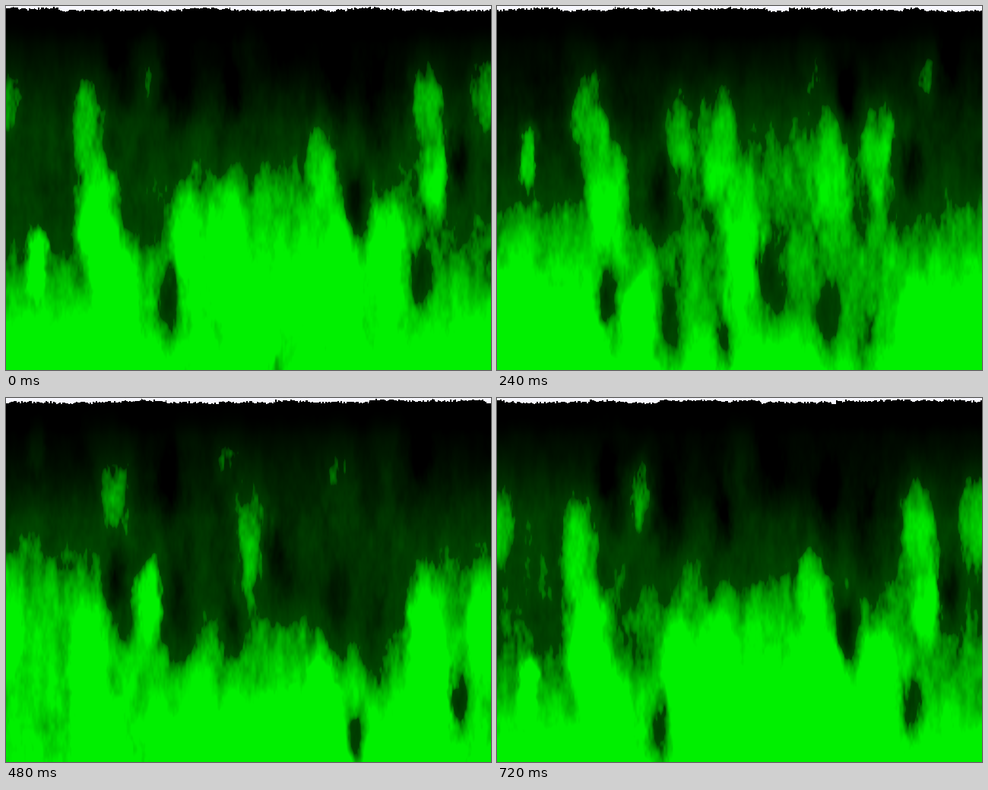
Animation of 638 by 479 pixels, one loop 800 ms. Source, as an HTML page with a canvas:

```html
<!DOCTYPE html>
<html lang="en">
<head>
<meta charset="utf-8">
<title>Green fire</title>
<style>
html, body { margin: 0; width: 100%; height: 100%; overflow: hidden; background: #000; }
canvas { display: block; width: 638px; height: 479px; }
</style>
</head>
<body>
<canvas id="fire" width="638" height="479"></canvas>
<script>
const W = 638, H = 479, TILE = 480;
const STEPS = 10, STEP_MS = 80, RISE = TILE / STEPS;

// Key points of the fire: x, y, half height
const flames = [
  [105, 135, 75], [120, 270, 85], [145, 385, 90], [240, 300, 70],
  [289, 315, 85], [322, 440, 90], [437, 355, 85], [503, 320, 70],
  [418, 215, 70], [553, 110, 80], [567, 210, 70], [3, 95, 70],
  [628, 100, 75], [41, 340, 45], [190, 70, 55]
];
const hollows = [
  [150, 58, 55], [226, 85, 75], [297, 104, 45], [362, 20, 60],
  [435, 90, 65], [485, 100, 75], [597, 205, 45], [465, 258, 50],
  [545, 350, 45], [212, 400, 55]
];

const clamp = (v, lo = 0, hi = 1) => Math.min(hi, Math.max(lo, v));
const mix = (a, b, t) => a + (b - a) * t;
const ease = t => t * t * (3 - 2 * t);

function hash(x, y, seed) {
  let n = Math.imul(x, 374761393) ^ Math.imul(y, 668265263) ^ Math.imul(seed, 1442695041);
  n = Math.imul(n ^ (n >>> 13), 1274126177);
  n = Math.imul(n ^ (n >>> 15), 2246822519);
  return ((n ^ (n >>> 16)) >>> 0) / 4294967296;
}

// Smooth noise in -1..1 that repeats every TILE pixels vertically
function noise(x, y, cw, ch, seed) {
  const rows = TILE / ch;
  const gx = x / cw, gy = y / ch;
  const ix = Math.floor(gx), iy = Math.floor(gy);
  const tx = ease(gx - ix), ty = ease(gy - iy);
  const r0 = ((iy % rows) + rows) % rows, r1 = (r0 + 1) % rows;
  const top = mix(hash(ix, r0, seed), hash(ix + 1, r0, seed), tx);
  const low = mix(hash(ix, r1, seed), hash(ix + 1, r1, seed), tx);
  return mix(top, low, ty) * 2 - 1;
}

// Several octaves of noise, stretched upwards like licking flames
function streaks(x, y, seed) {
  let sum = 0;
  for (let o = 0, size = 20, amp = .1; o < 4; o++, size /= 2, amp *= .66) {
    sum += amp * noise(x, y, size, size * 3, seed + o);
  }
  return sum;
}

// Squared distance from a key point, in units of its size
function reach(x, y, [px, py, size]) {
  const dx = (x - px) / (size * .31);
  let dy = y - py;
  dy = (dy - TILE * Math.round(dy / TILE)) / size;
  return dx * dx + dy * dy;
}

function heatAt(x, y) {
  const wx = x + 45 * streaks(x, y, 10);
  const wy = y + 90 * streaks(x, y, 20);
  const turn = Math.PI * 2;
  let h = .53 + .18 * Math.cos(turn * (wx - 60) / W) * Math.cos(turn * (wy - 65) / TILE);
  for (const p of flames) {
    const q = reach(wx, wy, p);
    if (q < 3) h = mix(h, .95, Math.exp(-q * q));
  }
  for (const p of hollows) {
    const q = reach(wx, wy, p);
    if (q < 5) h = mix(h, .02, Math.exp(-q * 1.2));
  }
  return h + streaks(x, y, 30);
}

function green(h, y) {
  const need = (460 - y) / 400 + Math.max(0, 50 - y) / 70;
  const d = h - need;
  const dim = 70 * clamp(1 + 1.3 * d) * clamp((y - 8) / 150);
  return d <= 0 ? dim : mix(dim, 240, Math.pow(clamp(d / .38), .62));
}

function edgeDepth(x, step) {
  const seed = 40 + step;
  const shelf = noise(x, 0, 46, 60, seed) > 0 ? 1.5 : 4;
  const ripple = 1.2 * noise(x, 0, 11, 60, seed + STEPS);
  return Math.max(1, shelf + ripple + 2.8 * hash(x >> 1, step, 70));
}

const ctx = document.getElementById('fire').getContext('2d');
const image = ctx.createImageData(W, H);
const heat = Float32Array.from({ length: W * TILE }, (_, i) => heatAt(i % W, Math.floor(i / W)));
let shown = -1;

function draw(step) {
  const px = image.data;
  const shift = step * RISE;
  for (let y = 0, i = 0; y < H; y++) {
    const row = ((y + shift) % TILE) * W;
    for (let x = 0; x < W; x++, i += 4) {
      px[i] = px[i + 2] = 0;
      px[i + 1] = green(heat[row + x], y);
      px[i + 3] = 255;
    }
  }
  for (let x = 0; x < W; x++) {
    const depth = edgeDepth(x, step);
    for (let y = 0; y < depth; y++) {
      const i = (y * W + x) * 4;
      px[i] = px[i + 1] = 248;
      px[i + 2] = 255;
    }
  }
  ctx.putImageData(image, 0, 0);
}

function tick() {
  const step = Math.floor(performance.now() / STEP_MS) % STEPS;
  if (step !== shown) draw(shown = step);
  requestAnimationFrame(tick);
}
tick();
</script>
</body>
</html>
```
